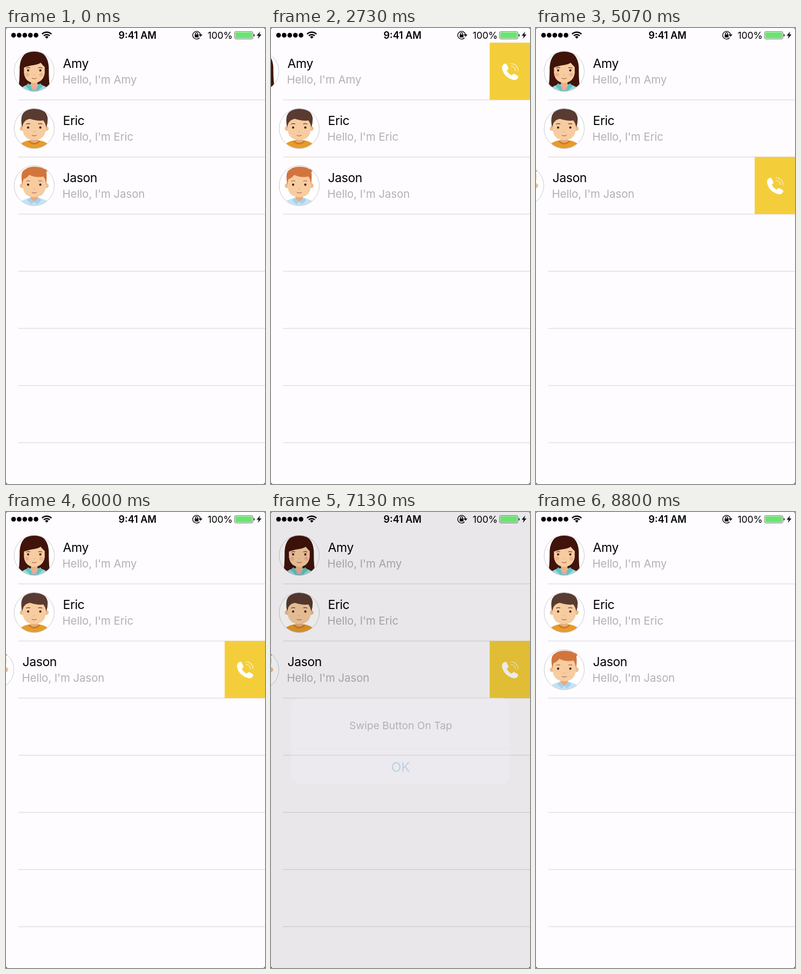
These frames come from a looping animation (480x846 px, 8870 ms). An HTML page:

```html
<!DOCTYPE html>
<html lang="en">
<head>
<meta charset="utf-8">
<title>Swipe list</title>
<style>
  html, body { margin: 0; width: 100%; height: 100%; overflow: hidden; background: #fefcff; }
  svg { display: block; width: 100%; height: 100%; }
  text { font-family: Inter, "Open Sans", sans-serif; }
  .name { font-size: 23px; letter-spacing: -.4px; }
  .note { font-size: 20.4px; letter-spacing: -.08px; fill: #b3b1b6; }
  .mid { text-anchor: middle; }
</style>
</head>
<body>
<svg id="stage" viewBox="0 0 480 846">
  <defs>
    <clipPath id="round"><circle r="37.2"/></clipPath>

    <g id="eyes">
      <circle cx="-11.3" cy="-1.8" r="2.1" fill="#43241a"/>
      <circle cx="11.3" cy="-1.8" r="2.1" fill="#43241a"/>
      <path d="M-4 12.4Q0 14.8 4 12.4" fill="none" stroke="#b8694c" stroke-width="1.2" stroke-linecap="round"/>
      <path d="M-1.6 5.6Q0 6.6 1.6 5.6" fill="none" stroke="#e2a97c" stroke-width="1.1"/>
    </g>

    <g id="brows" fill="none" stroke-width="1.2" stroke-linecap="round">
      <path d="M-14.5 -8.2Q-11 -10 -8 -8.6M8 -8.6Q11 -10 14.5 -8.2"/>
    </g>

    <g id="boy">
      <circle cx="-22.4" cy="0" r="4.4" fill="#f0bd8e"/>
      <circle cx="22.4" cy="0" r="4.4" fill="#f0bd8e"/>
      <path d="M-7 15H7V27Q0 32 -7 27Z" fill="#e6ac7c"/>
      <path d="M-21.5 -20H21.5V2Q19.5 21 0 21.5Q-19.5 21 -21.5 2Z" fill="#f7cca0"/>
    </g>

    <g id="avatar0">
      <path d="M-29 28Q-27 18 -27 -8Q-25 -37 0 -38Q25 -37 27 -8Q27 18 29 28Q18 31 0 27Q-18 31 -29 28Z" fill="#40140b"/>
      <path d="M-29 39Q-25 27 -10 24H10Q25 27 29 39Z" fill="#98d9e2"/>
      <path d="M-6 15H6V25L0 33L-6 25Z" fill="#e9b184"/>
      <path d="M-11 22L0 33L11 22L16 27L5 38H-5L-16 27Z" fill="#62c3bb"/>
      <path d="M-6 26L0 33L6 26L4 35H-4Z" fill="#ef9db0"/>
      <path d="M-19 -7Q-12 -10 -2 -11.5Q7 -13 12 -16Q16 -11 19.5 -8V3Q17 20 0 21.5Q-17 20 -19 3Z" fill="#f7cca0"/>
      <circle cx="-13" cy="6" r="3.8" fill="#f3b294"/>
      <circle cx="13" cy="6" r="3.8" fill="#f3b294"/>
      <use href="#brows" stroke="#7a4029" transform="translate(0 2)"/>
      <use href="#eyes"/>
    </g>

    <g id="avatar1">
      <path d="M-32 39Q-28 25 -9 22H9Q28 25 32 39Z" fill="#e79b2b"/>
      <use href="#boy"/>
      <path d="M-9 22Q0 31 9 22L11 24Q0 35 -11 24Z" fill="#c97d1d"/>
      <path d="M-22.5 -2Q-27 -24 -18 -31Q-8 -38 6 -36Q24 -34 25 -18Q25 -9 22.5 -2L20 -10L17 -15Q6 -13.5 -8 -18Q-16 -17 -20 -10Z" fill="#593b31"/>
      <use href="#brows" stroke="#593b31"/>
      <use href="#eyes"/>
    </g>

    <g id="avatar2">
      <path d="M-32 39Q-28 27 -9 23H9Q28 27 32 39Z" fill="#c4e3f6"/>
      <use href="#boy"/>
      <path d="M-9 22L0 30L9 22L13 27L5 35L0 30L-5 35L-13 27Z" fill="#a8d0ee"/>
      <path d="M-22 -2Q-26 -22 -20 -28Q-10 -37 5 -35Q15 -34 18 -31L25.5 -30Q25 -27 22.5 -25Q24 -17 22 -2L20 -12L17 -17Q3 -14 -9 -20Q-14 -14 -20 -12Z" fill="#d2753d"/>
      <use href="#brows" stroke="#c0703c"/>
      <use href="#eyes"/>
    </g>

    <g id="call">
      <rect y="-.8" width="75" height="106" fill="#f4ce3a"/>
      <g transform="translate(38 53)">
        <path d="M-15 -8Q-14 -14 -9 -15Q-7 -15.5 -6 -13L-3 -7Q-2.5 -5 -4 -4L-6 -2Q-3 4 3 7L5 5Q6.5 3.5 8 4.3L14 7.5Q16 9 15 11Q12 16 7 15.5Q-13 10 -15 -8Z" fill="#fff"/>
        <path d="M2 -15A13 13 0 0 1 15 -2M2 -10A8 8 0 0 1 10 -2" fill="none" stroke="#fff" stroke-opacity=".8" stroke-width="1.2" stroke-linecap="round"/>
      </g>
    </g>
  </defs>

  <rect width="480" height="846" fill="#fefcff"/>
  <g id="lines" fill="#e1dfe6"></g>
  <g id="rows"></g>

  <rect id="dim" width="480" height="846" fill="#050007" opacity="0"/>
  <g id="alert" opacity="0">
    <rect x="37.5" y="344.5" width="405.5" height="160" rx="18" fill="#faf8fc"/>
    <rect x="37.5" y="438.5" width="405.5" height="1" fill="#dddbe1"/>
    <text class="mid" x="240.5" y="402.8" font-size="19.2">Swipe Button On Tap</text>
    <text class="mid" x="240" y="482" font-size="24.5" letter-spacing="-.4" fill="#2e83cd">OK</text>
  </g>

  <g id="status">
    <g id="dots"></g>
    <g fill="none" stroke="#000" stroke-width="2.6">
      <path d="M66.8 11.2A12.6 12.6 0 0 1 84.2 11.2M70 14.4A8 8 0 0 1 81 14.4"/>
    </g>
    <path d="M72.3 16.4Q75.5 13.8 78.7 16.4L75.5 19.8Z"/>
    <text class="mid" x="243.7" y="19.6" font-size="18" font-weight="600">9:41 AM</text>
    <path d="M358.6 18.2A7.2 7.2 0 1 1 360.3 12" fill="none" stroke="#000" stroke-width="1.4"/>
    <path d="M357 12H364L360.5 16.2Z"/>
    <rect x="349.7" y="12" width="7" height="5.4" rx=".7"/>
    <path d="M351.2 12.5V10.6A2 2 0 0 1 355.2 10.6V12.5" fill="none" stroke="#000" stroke-width="1.3"/>
    <text x="373.7" y="19.6" font-size="17.6" letter-spacing="-.1">100%</text>
    <rect x="423.6" y="6.6" width="34" height="13.8" rx="2.4" fill="none" stroke="#6f7570" stroke-width="1"/>
    <rect x="425" y="8" width="31.2" height="11" rx="1.2" fill="#67e66e"/>
    <path d="M458.8 11Q461 11.3 461 13.5T458.8 16Z" fill="#333"/>
    <path d="M471 6.5L464.6 14.2H468.4L466.8 20L473.4 12H469.4Z"/>
  </g>
  <path d="M0 0H3Q0 0 0 3ZM480 0V3Q480 0 477 0ZM0 846V842Q0 846 4 846ZM480 846H476Q480 846 480 842Z" fill="#333"/>
</svg>

<script>
const LOOP = 8870, PITCH = 106, TOP = 28, BUTTON = 74.7;
const $ = id => document.getElementById(id);

// [time, value] steps, eased between neighbours
const people = [
  { name: "Amy",   swipe: [[1762, 0], [2150, 81], [2230, 81], [2350, 75], [3120, 75], [3420, 0]] },
  { name: "Eric",  swipe: [[3200, 0], [3550, 81], [3640, 81], [3760, 75], [4500, 75], [4800, 0]] },
  { name: "Jason", swipe: [[4560, 0], [4870, 80], [4920, 80], [5040, 75], [7940, 75], [8270, 0]] }
];
const fade = [[6000, 0], [6380, 1], [6880, 1], [7245, 0]];
const zoom = [[6000, 1.18], [6400, 1]];

function at(steps, t) {
  if (t <= steps[0][0]) return steps[0][1];
  for (let i = 1; i < steps.length; i++) {
    const [a, v] = steps[i - 1], [b, w] = steps[i];
    if (t < b) {
      const x = (t - a) / (b - a);
      return v + (w - v) * x * x * (3 - 2 * x);
    }
  }
  return steps[steps.length - 1][1];
}

$("dots").innerHTML = [0, 1, 2, 3, 4]
  .map(i => `<circle cx="${14 + i * 10.4}" cy="13.4" r="4.3"/>`).join("");

$("lines").innerHTML = [1, 2, 3, 4, 5, 6, 7]
  .map(i => `<rect x="22.5" y="${TOP - 1.4 + i * PITCH}" width="457.5" height="1.5"/>`).join("");

$("rows").innerHTML = people.map((p, i) => `
  <g transform="translate(0 ${TOP + i * PITCH})">
    <clipPath id="open${i}"><rect id="gap${i}" x="480" y="-1" width="75" height="108"/></clipPath>
    <g clip-path="url(#open${i})"><use href="#call" x="405"/></g>
    <g id="cell${i}">
      <g transform="translate(52.3 52.5)">
        <circle r="37.2" fill="#fff"/>
        <g clip-path="url(#round)"><use href="#avatar${i}"/></g>
        <circle r="37.2" fill="none" stroke="#cbc9ce"/>
      </g>
      <text class="name" x="105.5" y="46">${p.name}</text>
      <text class="note" x="104.5" y="75">Hello, I'm ${p.name}</text>
    </g>
  </g>`).join("");

function draw(t) {
  people.forEach((p, i) => {
    const d = at(p.swipe, t);
    $("cell" + i).setAttribute("transform", `translate(${-d} 0)`);
    $("gap" + i).setAttribute("x", 480 - Math.min(d, BUTTON));
  });
  const f = at(fade, t), z = at(zoom, t);
  $("dim").setAttribute("opacity", f * 0.36);
  $("alert").setAttribute("opacity", f);
  $("alert").setAttribute("transform", `translate(240 424.5) scale(${z}) translate(-240 -424.5)`);
}

const start = performance.now();
function tick() {
  draw((performance.now() - start) % LOOP);
  requestAnimationFrame(tick);
}
tick();
</script>
</body>
</html>
```
